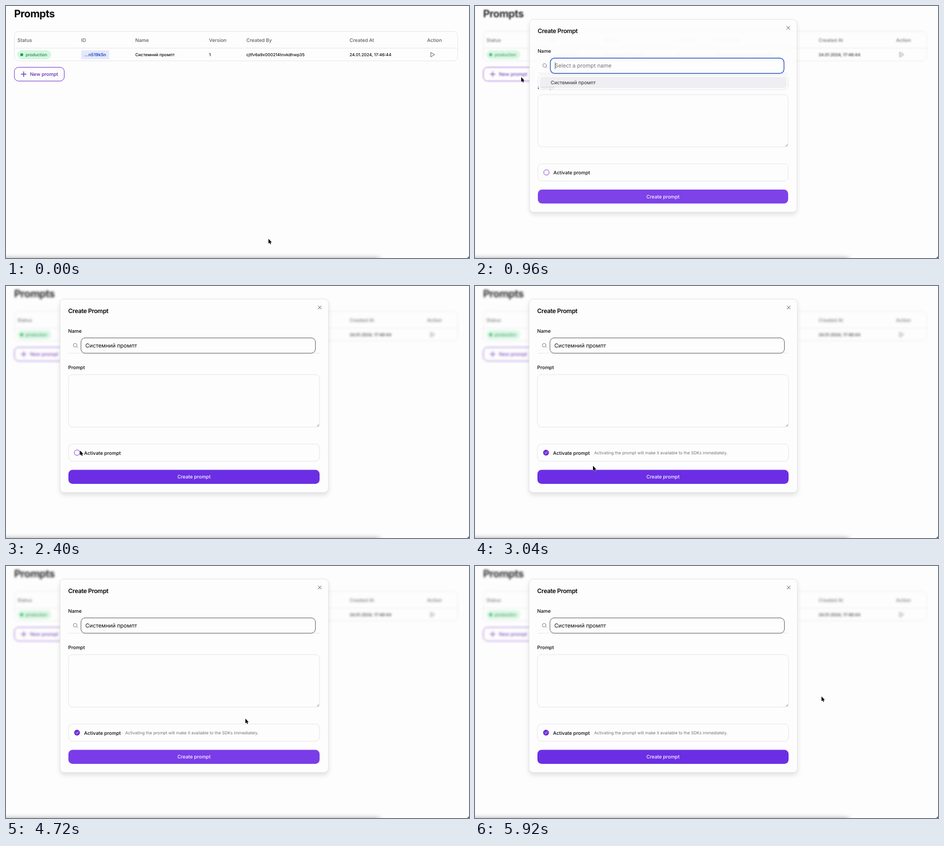
These frames come from a looping animation (942 px wide and 512 px high, 6 s). An HTML page:

```html
<!DOCTYPE html>
<html lang="en">
<head>
<meta charset="utf-8">
<title>Prompts</title>
<style>
html, body { margin: 0; width: 100%; height: 100%; overflow: hidden; background: #fdfdfd; }
svg { display: block; width: 942px; height: 512px; }
text { font: 500 9.8px Inter, "Noto Sans", sans-serif; fill: #09090b; text-rendering: geometricPrecision; white-space: pre; }
.head text { fill: #5f5f68; }
.row text, .small { font-size: 8.45px; }
.line { fill: none; stroke: #e4e4e7; }
.icon { fill: none; stroke-linecap: round; stroke-linejoin: round; }
#dialog { transform-origin: 382.5px 222.5px; }
</style>
</head>
<body>
<svg viewBox="0 0 942 512">
  <defs>
    <filter id="soft" x="-10%" y="-200%" width="120%" height="500%"><feGaussianBlur stdDeviation="6"/></filter>
  </defs>
  <rect width="942" height="512" fill="#fdfdfd"/>

  <g id="page">
    <text x="16.5" y="23.2" style="font-size:21px;font-weight:700;letter-spacing:-.025em">Prompts</text>
    <rect class="line" x="17" y="51.5" width="902" height="60" rx="8.5"/>
    <path class="line" d="M17 85.5H919"/>
    <g class="head" id="head"></g>
    <g class="row">
      <rect x="23" y="90" width="69" height="18" rx="9" fill="#d3f7df"/>
      <circle cx="32" cy="99" r="3" fill="#17a34a"/>
      <text x="40" y="102" style="fill:#2b8050">production</text>
      <rect x="153" y="90" width="57" height="18" rx="3" fill="#e6e8fb"/>
      <text x="159" y="102" style="fill:#2a5bc4;font-weight:700;font-size:8.7px">...n519k5n</text>
      <text x="263" y="102">Системний промпт</text>
      <text x="413" y="102">1</text>
      <text x="489" y="102">cjtfv6a9x000214tnvkdhwp35</text>
      <text x="699" y="102">24.01.2024, 17:46:44</text>
      <path class="icon" d="M864.3 94.6V103.4L871.7 99Z" stroke="#55555c"/>
    </g>
    <rect id="add" x="17" y="124.5" width="101.5" height="28" rx="8.5" stroke="#6d28c9"/>
    <path class="icon" d="M31 138.5H41M36 133.5V143.5" stroke="#6428b4" stroke-width="1.4"/>
    <text x="48.7" y="142.2" style="fill:#6428b4">New prompt</text>
  </g>

  <rect x="-40" y="514" width="800" height="30" opacity=".5" filter="url(#soft)"/>
  <path d="M942 508.5V512H938.5Z" fill="#555"/>

  <g id="dialog">
    <rect x="110" y="26.5" width="546" height="393" rx="8.5" fill="#fdfdfd" stroke="#e2e2e6" style="filter:drop-shadow(0 5px 5px #0000001c)"/>
    <text x="126.6" y="54.6" style="font-size:12.4px;font-weight:600;letter-spacing:-.03em">Create Prompt</text>
    <path class="icon" d="M635 40.5L641.4 46.9M641.4 40.5L635 46.9" stroke="#44444b"/>
    <text x="126.6" y="94.9">Name</text>
    <path class="line" d="M127 136.5H638"/>
    <g class="icon" stroke="#77777f"><circle cx="140.7" cy="120.3" r="3.7"/><path d="M143.5 123L145.6 125.1"/></g>
    <rect id="field" x="152.5" y="105.5" width="477" height="31" rx="8.5" fill="#fdfdfd"/>
    <text id="value" x="161.6" y="125" style="font-size:11.2px;font-weight:400"></text>
    <path id="caret" d="M162.3 114V128" stroke="#222" stroke-width=".8"/>
    <text x="126.6" y="169.3">Prompt</text>
    <rect class="line" x="127" y="180" width="511" height="106.5" rx="8.5"/>
    <path class="icon" d="M632.5 285.5L637 281M635.5 285.5L637 284" stroke="#77777c" stroke-width=".8"/>
    <rect class="line" x="127" y="321" width="511" height="35" rx="8.5"/>
    <circle id="check" cx="144.5" cy="338.6" r="5.5" stroke="#6d2fcf"/>
    <path id="tick" class="icon" d="M142.2 338.8L143.9 340.5L147 336.8" stroke="#fff"/>
    <text x="158.8" y="342.7">Activate prompt</text>
    <text id="hint" class="small" x="242.4" y="341.6" style="fill:#71717a;font-weight:400">Activating the prompt will make it available to the SDKs immediately.</text>
    <rect id="submit" x="127" y="373.5" width="511" height="28.5" rx="8.5"/>
    <text x="382.5" y="391.4" text-anchor="middle" style="fill:#faf8ff">Create prompt</text>
    <g id="menu">
      <rect x="127" y="140" width="511" height="29.7" rx="8.5" fill="#fdfdfd" stroke="#e2e2e6"/>
      <rect x="131" y="143.5" width="504" height="23" rx="6" fill="#eeeef2"/>
      <text x="153.3" y="158.9" style="font-weight:400">Системний промпт</text>
    </g>
  </g>

  <g id="cursor">
    <path id="arrow" d="M0 0V9.8L2.2 7.8L3.7 11L5.3 10.3L3.9 7.2H6.8Z" fill="#000" stroke="#fff" stroke-width=".8" paint-order="stroke"/>
    <path id="hand" d="M-.8 .8C-.8 -.4 1 -.4 1 .8V3.7L2.5 3.8L4 4.2L5.5 4.8C6.3 5.4 5.8 7.5 5 9V10.5H.3V9.5L-2.3 6.2C-2.8 5 -1.7 4.6 -.8 5.6ZM1.2 6.5V8.5M2.7 6.5V8.5M4 6.5V8.5" fill="#fff" stroke="#111" stroke-width=".8" stroke-linejoin="round"/>
  </g>
</svg>
<script>
const $ = id => document.getElementById(id);
const clamp = v => Math.max(0, Math.min(1, v));
const set = (id, attrs) => { for (const k in attrs) $(id).setAttribute(k, attrs[k]); };
const show = (id, on) => $(id).style.display = on ? '' : 'none';

const columns = { Status: 23.3, ID: 153, Name: 263, Version: 413, 'Created By': 489, 'Created At': 699, Action: 856.8 };
$('head').innerHTML = Object.entries(columns).map(([s, x]) => `<text x="${x}" y="72.6">${s}</text>`).join('');

const LOOP = 6000, STEP = 80;
const OPEN = 860, PICK = 1760, CHECK = 2560;
// Pointer stops: time, x, y
const path = [
  [0, 534, 473], [80, 534, 473], [680, 94, 145], [960, 94, 144.5],
  [1400, 176, 155], [1800, 178, 156], [2320, 151, 334], [2720, 147, 337],
  [3360, 333, 393.5], [4400, 333, 393.5], [4720, 487, 310],
  [5120, 639, 284], [5760, 701, 266], [5920, 705, 265]
];

function pointer(t) {
  let i = path.findIndex(p => p[0] > t);
  if (i < 0) return path[path.length - 1].slice(1);
  const [t0, x0, y0] = path[i - 1], [t1, x1, y1] = path[i];
  const u = (t - t0) / (t1 - t0), e = t0 < 4400 ? u * u * (3 - 2 * u) : u;
  return [x0 + (x1 - x0) * e, y0 + (y1 - y0) * e];
}

function draw(t) {
  const open = 1 - (1 - clamp((t - OPEN) / 170)) ** 3;
  const picked = t >= PICK, checked = t >= CHECK;
  const [x, y] = pointer(t);
  const onAdd = t < OPEN && x < 118 && y < 152;
  const onSubmit = t > 3000 && y > 373 && y < 402;

  $('page').style.filter = open ? `blur(${2.1 * open ** 4}px)` : 'none';
  $('page').style.opacity = 1 - .17 * open;
  set('add', { fill: onAdd ? '#efe7fd' : '#fdfdfd' });

  show('dialog', open > 0);
  $('dialog').style.opacity = open ** .5;
  $('dialog').style.transform = `scale(${.95 + .05 * open})`;

  set('field', picked ? { stroke: '#55555b', 'stroke-width': 1 } : { stroke: '#3c62cc', 'stroke-width': 1.7 });
  $('value').textContent = picked ? 'Системний промпт' : 'Select a prompt name';
  $('value').style.fill = picked ? '#09090b' : '#71717a';
  show('caret', !picked && (t - OPEN) % 1000 < 500);
  show('menu', !picked);
  $('menu').style.opacity = open < 1 ? .9 : 1;

  set('check', { fill: checked ? '#6d2fd8' : '#fdfdfd' });
  show('tick', checked);
  show('hint', checked);
  const light = t < 1360 || onSubmit || (t > 4400 && t < 4800);
  set('submit', { fill: light ? '#7a3ce8' : '#6c2ee4' });

  set('cursor', { transform: `translate(${x} ${y})` });
  show('hand', onAdd || onSubmit);
  show('arrow', !(onAdd || onSubmit));
}

const start = performance.now();
function tick() {
  const t = (performance.now() - start) % LOOP;
  draw(Math.floor(t / STEP) * STEP);
  requestAnimationFrame(tick);
}
tick();
</script>
</body>
</html>
```
